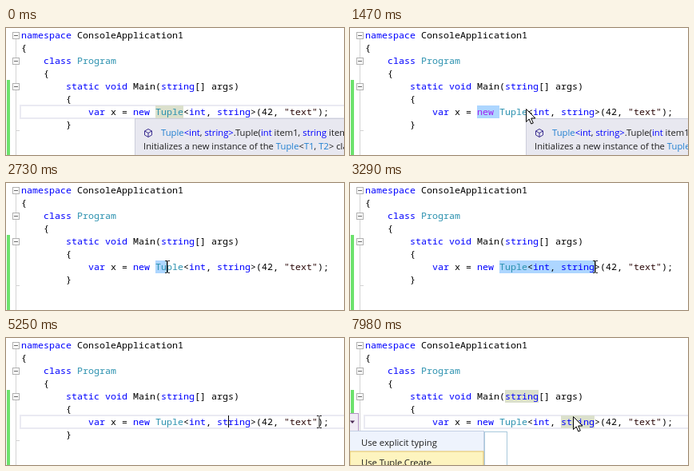
An HTML page that plays this animation: 423 by 159 pixels, repeating every 8 s.

```html
<!DOCTYPE html>
<html lang="en">
<head>
<meta charset="utf-8">
<title>Code editor</title>
<style>
  html, body { margin: 0; width: 100%; height: 100%; overflow: hidden; background: #fff; }
  svg { display: block; }
  text { white-space: pre; }
  .code { font: 11.667px "Noto Sans Mono", "DejaVu Sans Mono", monospace; }
  .ui { font: 11.25px "Open Sans", "Noto Sans", sans-serif; fill: #1e1e1e; }
  .kw { fill: #00f; }
  .type { fill: #2b91af; }
  .link { fill: #1f7fd0; }
  .str { fill: #2a0808; }
  .picked { fill: #a020f0; }
  .mark { fill: #dbe0cc; }
</style>
</head>
<body>
<svg width="423" height="159" viewBox="0 0 423 159">
  <rect width="423" height="159" fill="#fff"/>
  <rect id="line" x="18" y="97" width="420" height="16" fill="none" stroke="#eaeaf2" stroke-width="2"/>
  <g id="tuple"><rect class="mark" x="187" y="97" width="35" height="16"/></g>
  <g id="strings">
    <rect class="mark" x="194" y="65" width="42" height="16"/>
    <rect class="mark" x="264" y="97" width="42" height="16"/>
  </g>
  <rect id="sel" y="97" height="16" fill="#add6ff"/>
  <rect x="1" y="65" width="4" height="94" fill="#6ce26c"/>
  <g id="gutter"><path d="M12.5 5V159M12.5 128.500H17" fill="none" stroke="#d4d4d4"/></g>
  <g id="code" class="code"></g>
  <rect id="caret" y="97" width="1" height="15"/>
  <g id="tip">
    <rect x=".5" y="113.500" width="440" height="60" fill="#e8e8f0" stroke="#ccceDB"/>
    <path d="M17 126.500l4.500 2.500v5l-4.500 2.500l-4.500-2.500v-5zM12.500 129l4.500 2.500l4.500-2.500M17 131.500v5" fill="none" stroke="#3a2d90"/>
    <text class="ui" x="33" y="135"><tspan class="link">Tuple</tspan><tspan class="kw">&lt;int</tspan>, <tspan class="kw">string&gt;</tspan>.Tuple(<tspan class="kw">int</tspan> item1, <tspan class="kw">string</tspan> item2)</text>
    <text class="ui" x="11" y="152">Initializes a new instance of the <tspan class="link">Tuple</tspan>&lt;<tspan class="link">T1</tspan>, <tspan class="link">T2</tspan>&gt; class.</text>
  </g>
  <g id="tag">
    <rect x="-4.500" y="94.500" width="15" height="22" fill="#f1ecf5" stroke="#b394c4"/>
    <path d="M0 103.500h6l-3 3.500z" fill="#4a2a55"/>
  </g>
  <g id="menu">
    <rect x="-.5" y="116.500" width="168" height="60" fill="#eef3fd" stroke="#c3cfe4"/>
    <rect id="hover" width="167" height="24" fill="#fdf4bf" stroke="#e5c365"/>
    <rect id="pane" x="168.500" y="117.500" height="60" fill="#fff" stroke="#a9c9dc"/>
    <text class="ui" x="14" y="135">Use explicit typing</text>
    <text class="ui" x="14" y="160">Use Tuple.Create</text>
  </g>
  <path id="beam" d="M-3 .5h2.500M.5 .5h2.500M-3 15.500h2.500M.5 15.500h2.500M0 1v14" fill="none" stroke="#222"/>
  <path id="arrow" d="M.5.5v16l3.700-3.500l2.600 6l2.500-1l-2.600-6h5.200z" fill="#fff" stroke="#000"/>
</svg>
<script>
const $ = id => document.getElementById(id);
const NS = 'http://www.w3.org/2000/svg';
const colX = col => 19 + 7 * col;

function add(parent, name, attrs, text = '') {
  const el = document.createElementNS(NS, name);
  for (const key in attrs) el.setAttribute(key, attrs[key]);
  el.textContent = text;
  return parent.appendChild(el);
}

const source = `namespace ConsoleApplication1
{
    class Program
    {
        static void Main(string[] args)
        {
            var x = new Tuple<int, string>(42, "text");
        }`;

function classOf(token) {
  if (/^(namespace|class|static|void|string|var|new|int)$/.test(token)) return 'kw';
  if (/^(Program|Tuple)$/.test(token)) return 'type';
  return token[0] === '"' ? 'str' : '';
}

let newWord;
source.split('\n').forEach((row, i) => {
  for (const m of row.matchAll(/"\w+"|\w+|[^\s\w"]+/g)) {
    const el = add($('code'), 'text',
      { x: colX(m.index), y: 13 + 16 * i, class: classOf(m[0]) }, m[0]);
    if (m[0] === 'new') newWord = el;
  }
});

for (const y of [5.5, 37.5, 69.5]) {
  add($('gutter'), 'rect', { x: 8.5, y, width: 8, height: 8, fill: '#fff', stroke: '#b0b0b0' });
  add($('gutter'), 'path', { d: `M10 ${y + 4}h5`, stroke: '#666' });
}

// One selection step every 70 ms; the mouse follows the selection end.
const drag = (start, from, ends) => ends.map((to, i) =>
  [start + 70 * i, { line: 0, tuple: 0, from, to, caret: to, beam: [colX(to) + 1, 97] }]);

// Times with the values that change there; the rest carries over.
const steps = [
  [0, { line: 1, tuple: 1, tip: 161 }],
  [140, { beam: [163, 95] }],
  [560, { tip: 0, beam: [160, 97] }],
  ...drag(630, 20, [20, 21, 22, 23, 24]),
  [980, { beam: 0, caret: 0, arrow: [186, 105] }],
  [1190, { arrow: [200, 105] }],
  [1260, { arrow: [208, 105], tip: 220 }],
  [1400, { arrow: [214, 103] }],
  [1470, { arrow: [220, 101] }],
  [1540, { arrow: 0 }],
  [1680, { tip: 0 }],
  [1820, { line: 1, tuple: 1, to: 0, beam: [309, 97] }],
  [2100, { beam: [212, 97] }],
  [2170, { beam: [203, 97] }],
  [2240, { beam: [197, 97] }],
  [2310, { beam: [194, 97] }],
  [2450, { beam: [190, 97] }],
  [2520, { beam: [188, 97], caret: 24 }],
  ...drag(2660, 24, [25, 26, 27, 28, 29, 31, 33, 35, 38, 41, 42]),
  [3640, { strings: 1 }],
  [3780, { beam: 0, arrow: [308, 105] }],
  [3920, { arrow: [310, 105] }],
  [4130, { strings: 0, tip: 311 }],
  [4340, { caret: 0 }],
  [4480, { arrow: 0 }],
  [4620, { line: 1, to: 0, caret: 42 }],
  [4830, { tip: 0, beam: [300, 97] }],
  [4900, { beam: [290, 97] }],
  [5040, { beam: [283, 97], caret: 37 }],
  [5110, { beam: [320, 97] }],
  [5180, { beam: [360, 97] }],
  [5250, { beam: [392, 97] }],
  [5670, { strings: 1 }],
  [5740, { beam: 0 }],
  [6230, { caret: 0 }],
  [6510, { tag: 1, arrow: [279, 98] }],
  [6580, { menu: 118, pane: 28 }],
  [6650, { pane: 280 }],
  [7980, { menu: 142, pane: 28 }]
];

const show = (id, on) => $(id).style.display = on ? '' : 'none';

function place(id, pos) {
  show(id, pos);
  if (pos) $(id).setAttribute('transform', `translate(${pos})`);
}

function draw(t) {
  const s = { from: 0, to: 0 };
  for (const [time, change] of steps) if (time <= t) Object.assign(s, change);
  for (const id of ['line', 'tuple', 'strings', 'tag', 'menu']) show(id, s[id]);
  for (const id of ['beam', 'arrow']) place(id, s[id]);
  place('caret', s.caret && [colX(s.caret), 0]);
  place('tip', s.tip && [s.tip, 0]);
  place('hover', s.menu && [0, s.menu]);
  $('pane').setAttribute('width', s.pane || 0);
  const selected = s.to > s.from;
  show('sel', selected);
  if (selected) {
    $('sel').setAttribute('x', colX(s.from));
    $('sel').setAttribute('width', 7 * (s.to - s.from));
  }
  newWord.setAttribute('class', selected && s.from === 20 ? 'picked' : 'kw');
}

const began = performance.now();
function tick() {
  draw((performance.now() - began) % 8000);
  requestAnimationFrame(tick);
}
tick();
</script>
</body>
</html>
```
